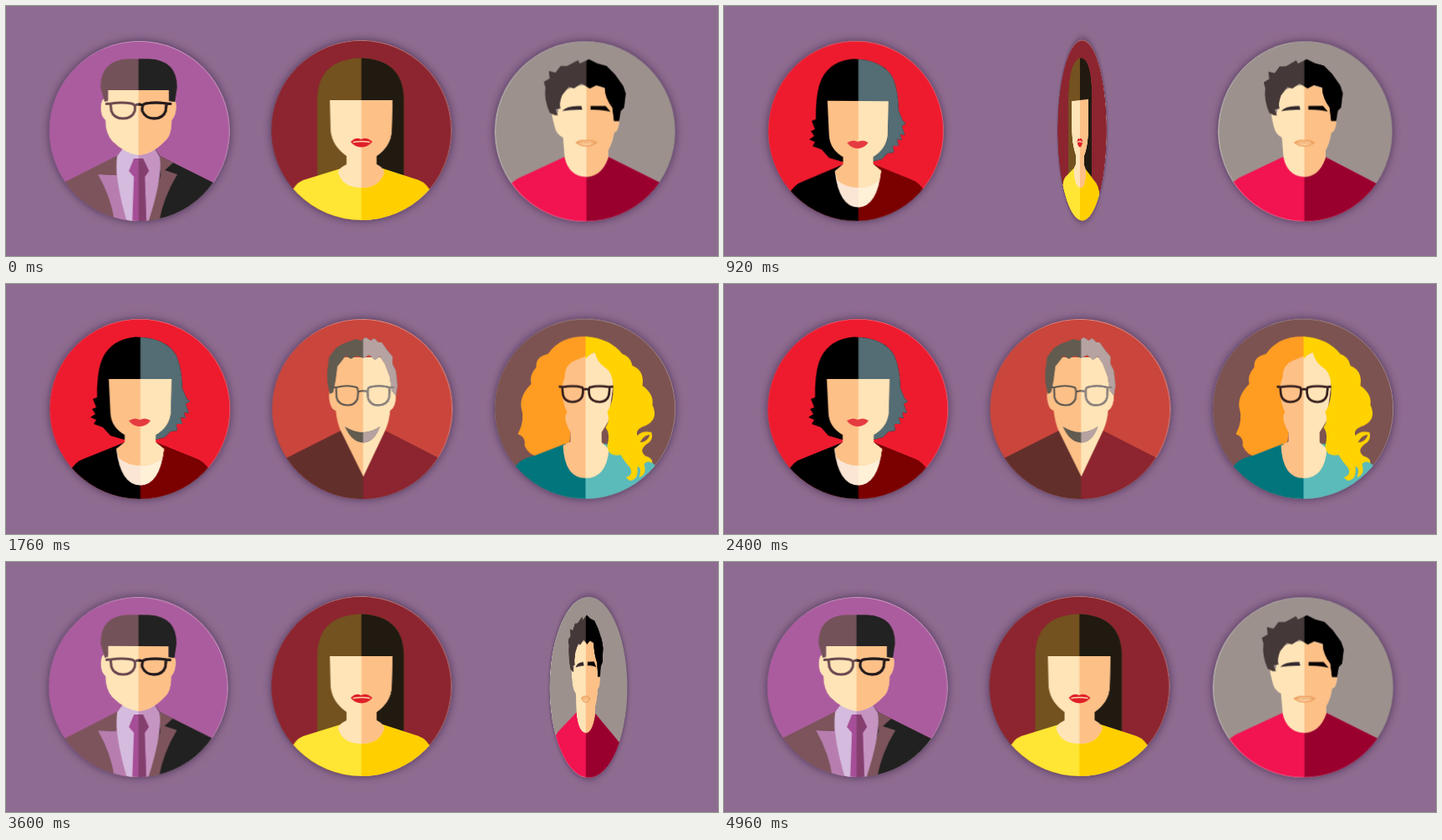
Write an HTML page that moves like this. It is 852x300 px and loops after 5000 ms.

```html
<!DOCTYPE html>
<html lang="en">
<head>
<meta charset="utf-8">
<title>Flipping portraits</title>
<style>
  html, body { margin: 0; width: 100%; height: 100%; overflow: hidden; background: #8e6b90; }
  .stage { position: relative; width: 852px; height: 300px; overflow: hidden; }
  .slot { position: absolute; top: 42px; width: 216px; height: 216px; perspective: 1100px; }
  .card { width: 100%; height: 100%; transform-style: preserve-3d; }
  .face {
    position: absolute; inset: 0; border-radius: 50%; overflow: hidden;
    backface-visibility: hidden;
    box-shadow: 0 0 8px 1px rgba(52, 34, 66, .62);
  }
  .face svg { display: block; width: 100%; height: 100%; }
</style>
</head>
<body>
<div class="stage" id="stage"></div>
<script>
const LOOP = 5000;
const PALE = '#fee4b7', TAN = '#fdc087';

const path = (d, fill) => `<path d="${d}" fill="${fill}"/>`;
const line = (d, color, w) =>
  `<path d="${d}" fill="none" stroke="${color}" stroke-width="${w}" stroke-linejoin="round"/>`;

// One outline in two tones, divided at the face's middle line
const split = (d, left, right) => s => path(d, left) + `<g clip-path="url(#${s})">${path(d, right)}</g>`;
const splitLine = (d, left, right, w) => s =>
  line(d, left, w) + `<g clip-path="url(#${s})">${line(d, right, w)}</g>`;
const flat = (d, fill) => () => path(d, fill);
const stroke = (d, color, w) => () => line(d, color, w);

const suitMan = { mid: 158.5, bg: '#ab5c9e', dx: -.3, dy: 0, rim: [-.6, .5], parts: [
  split('M55 219L134 179 142 168H176L184 180 262 219V262H55Z', '#7d545b', '#212121'),
  flat('M110 202L130 203 133 180 158 179V260H130Q126 230 110 202Z', '#b77daf'),
  flat('M133 180L116 190 126 197 110 202 132 203Z', '#7d545b'),
  flat('M184 180L200 188 190 197 205 202Q188 230 183 260H168L185 203Z', '#7d545b'),
  flat('M158 179L176 168 184 181Q188 204 170 260H158Z', '#c594c0'),
  flat('M142 168L133 180Q129 206 145 260H158.5V179Z', '#d5bbdd'),
  split('M147 198L153 183H164L171 198 166 205 168 260H151L153 205Z', '#a64e97', '#843f6f'),
  split('M122 101H195V112Q203 108 203.5 121Q203 132 198 137Q198 156 190 162Q175 178 158 179Q142 177 127 162Q119 153 119 137Q113 132 113.5 121Q114 108 122 112Z', PALE, TAN),
  split('M118 115L113 98Q113 65 146 63.5H171Q205 65 204.5 98L202 115 195 114V101H122V114Z', '#745259', '#222'),
  splitLine('M119 117.5L126 117Q138 115 150 117Q156 118 154 126Q151 135 140 135Q129 135 126 126L125 117M155 119Q158.5 117 163 119M198 117.5L192 117Q179 115 167 117Q162 118 163 126Q167 135 177 135Q188 135 191 126L192 117', '#6b4a50', '#231b1b', 3)
] };

const longHair = { mid: 424.8, bg: '#8c252f', dx: -.5, dy: -1, rim: [-.6, .5], parts: [
  split('M372 212V110Q374 64 424 62.5Q474 64 475.5 110V212Z', '#73521f', '#211a11'),
  split('M340 226Q345 213 355 209L400 195H450L493 209Q504 213 509 226V262H340Z', '#ffe534', '#ffcf00'),
  split('M387 113H462L461 150Q460 168 443 180V190Q452 195 452 200Q446 218 425 218Q402 218 397 200Q397 195 407 190V180Q390 168 388 150Z', PALE, TAN),
  flat('M412 163Q418 156.500 424.500 160Q431 156.500 438 163Q432 169.500 425 169.500Q417 169.500 412 163Z', '#e01f26'),
  stroke('M415 163.500Q425 161.500 435 163.500', '#fbd3b0', 1.3)
] };

const darkHair = { mid: 694, bg: '#9c918d', dx: -.3, dy: .5, rim: [.8, 0], parts: [
  split('M595 219L612 207 668 181H720L780 211 795 221V264H595Z', '#f21351', '#9a002e'),
  split('M660 128L662 105Q694 84 728 105L731 128Q734 132 733 140Q732 151 727 152Q725 165 720 173V182Q712 205 693 205Q673 204 668 182L666 158Q658 154 656 145Q652 130 653 128Z', PALE, TAN),
  split('M656 131L650 128Q643 112 645 98L643 91 650 87 649 78 657 80 663 72 671 72 684 65 686 69 697 64 707 69 718 72 728 82 738 96 741 105 739 122 735 126 733 138 727 138 725 122Q716 110 716 98L706 95 698 99 688 93 679 99 673 97 665 107Q661 117 663 123L657 124 660 131Z', '#453838', '#000'),
  flat('M665 126Q671 119 688 120L689 124.500Q675 124 665 126Z', '#33282d'),
  flat('M699 120L717 120 723 127Q713 124 699 124.500Z', '#080505'),
  () => '<path d="M682 164Q688 160 694 162Q700 160 706 164Q700 168 694 168Q687 168 682 164Z" fill="#fbd0a0" stroke="#eda15f" stroke-width="1.6"/>',
  stroke('M683 164Q694 164.500 705 164', '#eda15f', 1.2)
] };

const bob = { mid: 160.8, bg: '#ee1b2e', dx: .3, dy: 0, rim: [-.3, .2], parts: [
  split('M109 125Q110 100 116 88Q127 66 155 63.5Q192 64 204 86Q211 103 211 125L216 137 220 141 215 144 219 155 213 154 215 161 209 160 211 168 204 168 205 176 197 177 190 184 178 187H142L125 182 116 172 105 168 108 163 101 160 107 156 103 150 108 148 104 138 109 136Z', '#000', '#546c73'),
  split('M76 226Q82 213 95 209L142 190H179L226 209Q238 213 245 226V262H76Z', '#000', '#7b0000'),
  split('M142 190H179L189 198Q184 241 160.500 241.500Q137 241 132 198Z', '#fbe6d5', '#fff0d8'),
  split('M123 114H198L197 155Q195 172 179 181V190L189 198L187 209Q176 218 161 218Q146 218 135 209L132 198 142 190V181Q126 172 125 155Z', TAN, PALE),
  flat('M147 164Q154 159.500 160 163Q167 159.500 173 164Q168 171 160 171Q152 171 147 164Z', '#e63a41')
] };

const greyHair = { mid: 426.8, bg: '#ca453b', dx: .4, dy: 0, rim: [-.6, .5], parts: [
  split('M315 219L400 176H453L537 219V262H315Z', '#632f2b', '#8c252f'),
  split('M392 126Q386 124 386 135Q387 150 394 152Q396 168 400 176L427 231 453 176Q458 165 459 152Q466 148 466 133Q467 124 461 125L455 88H397Z', TAN, PALE),
  split('M391 130L387 132Q383 118 384 104L386 88 394 77 402 72 410 69 418 66 424 68 430 64 436 68 440 65 445 70 449 70 456 80 462 87 462 96 466 104 468 122 466 134 461 128 459 112 453 96 447 87 441 91 434 85 427 89 419 86 412 90 406 86 400 94 396 99 394 115Z', '#615b50', '#b5a2a1'),
  splitLine('M389 124L395 124Q408 120.500 419 124Q422 126 420 138Q417 145.500 408 145.500Q397 145 395 136L394.500 124M421 129.500Q427 127 432 129.500M464 124L458 124Q446 120.500 434 124Q431 126 433 138Q436 145.500 445 145.500Q456 145 458 136L458.500 124', '#5e5750', '#8c8280', 2.2),
  split('M405 171Q427 185 447 171Q440 190 427 190.500Q413 190 405 171Z', '#615b50', '#b5a2a1')
] };

const curls = { mid: 693, bg: '#7c5351', dx: 0, dy: -.3, rim: [-.3, .2], parts: [
  flat('M694 63Q663 62 648 84Q633 87 634 100Q625 110 628 120Q614 134 616 148Q621 164 612 180Q622 184 620 194Q628 211 645 205Q667 204 674 188L676 170 694 160Z', '#ff9c22'),
  split('M606 224Q612 210 632 206L668 192H718L752 207Q770 211 776 217L764 262H600Z', '#00757c', '#5bbbba'),
  split('M704 82Q690 88 680 92Q668 97 668 112L664 125Q666 145 671 154Q665 160 675 178V189L666 194Q668 233 693 233Q718 233 721 198L712 190V178L720 165 726 120 725 106Z', TAN, PALE),
  flat('M693 63Q722 65 737 84Q747 87 749 98Q764 104 761 122Q775 132 773 145Q781 162 765 170Q752 174 755 182Q761 175 772 178Q775 188 765 193Q757 200 764 206Q774 209 773 215Q767 211 763 216Q767 229 757 232Q761 220 755 219Q757 235 746 236L741 232Q751 229 746 220Q738 211 735 205Q720 208 719 194Q723 180 717 172Q723 164 719 154Q727 140 726 125Q726 106 716 100Q707 94 704 82Q698 84 693 90Z', '#ffd200'),
  flat('M758 190Q767 190 770 181Q763 181 758 190Z', '#7c5351'),
  stroke('M661 123L666 123.500Q679 121.500 689 124Q691 127 689 135Q686 141.500 677 141.500Q668 141 666 133L665 123.500M690 127Q693.500 125 697 127M726 123L721 123.500Q708 121.500 698 124Q696 127 698 135Q701 141.500 710 141.500Q719 141 721 133L722 123.500', '#38211f', 2.8)
] };

// Each column: axis, front, back, and the turn as [ms, degrees] knots
const cards = [
  { x: 160, front: suitMan, back: bob, turn: [
    [600, 0], [920, 166], [1180, 194], [1600, 180],
    [2720, 180], [3040, 142], [3300, 64], [3580, -7], [3900, 0]] },
  { x: 425.5, front: longHair, back: greyHair, turn: [
    [720, 0], [920, 74], [1120, 164], [1280, 184], [1400, 188], [1680, 180],
    [2780, 180], [3040, 160], [3340, 66], [3600, 0], [3720, -4], [3900, 0]] },
  { x: 692.5, front: darkHair, back: curls, turn: [
    [820, 0], [920, 15], [1280, 124], [1460, 176], [1560, 187], [1760, 180],
    [2860, 180], [3040, 169], [3600, 65], [3760, 8], [3840, -4], [3940, 0]] }
];

// Smooth curve through the knots that never overshoots between them
function angleAt(knots, t) {
  const last = knots.length - 1;
  if (t <= knots[0][0]) return knots[0][1];
  if (t >= knots[last][0]) return knots[last][1];
  const slope = i => (knots[i + 1][1] - knots[i][1]) / (knots[i + 1][0] - knots[i][0]);
  const tangent = i => {
    if (i === 0 || i === last) return 0;
    const a = slope(i - 1), b = slope(i);
    return a * b <= 0 ? 0 : 2 * a * b / (a + b);
  };
  const i = knots.findIndex(k => k[0] > t) - 1;
  const [t0, a0] = knots[i], [t1, a1] = knots[i + 1];
  const h = t1 - t0, u = (t - t0) / h, v = 1 - u;
  return v * v * (1 + 2 * u) * a0 + u * v * v * h * tangent(i)
       + u * u * (3 - 2 * u) * a1 - u * u * v * h * tangent(i + 1);
}

function faceHtml(face, x, id, turn) {
  const { mid, bg, dx, dy, rim, parts } = face;
  const cx = x + dx, cy = 150 + dy;
  return `<div class="face" style="background:${bg};transform:${turn} translate(${dx}px,${dy}px)">
    <svg viewBox="${cx - 108} ${cy - 108} 216 216">
      <clipPath id="${id}"><rect x="${mid}" y="0" width="200" height="300"/></clipPath>
      ${parts.map(p => p(id)).join('')}
      <circle cx="${cx + rim[0]}" cy="${cy + rim[1]}" r="108.2" fill="none" stroke="#fff" stroke-opacity=".45" stroke-width="1"/>
    </svg></div>`;
}

const stage = document.getElementById('stage');
stage.innerHTML = cards.map(({ x, front, back }, i) =>
  `<div class="slot" style="left:${x - 108}px"><div class="card">
    ${faceHtml(front, x, 'front' + i, 'rotateY(0deg)')}
    ${faceHtml(back, x, 'back' + i, 'rotateY(180deg)')}
  </div></div>`).join('');
const nodes = [...stage.querySelectorAll('.card')];

function draw() {
  const t = performance.now() % LOOP;
  nodes.forEach((node, i) => {
    node.style.transform = `rotateY(${-angleAt(cards[i].turn, t)}deg)`;
  });
  requestAnimationFrame(draw);
}
draw();
</script>
</body>
</html>
```
